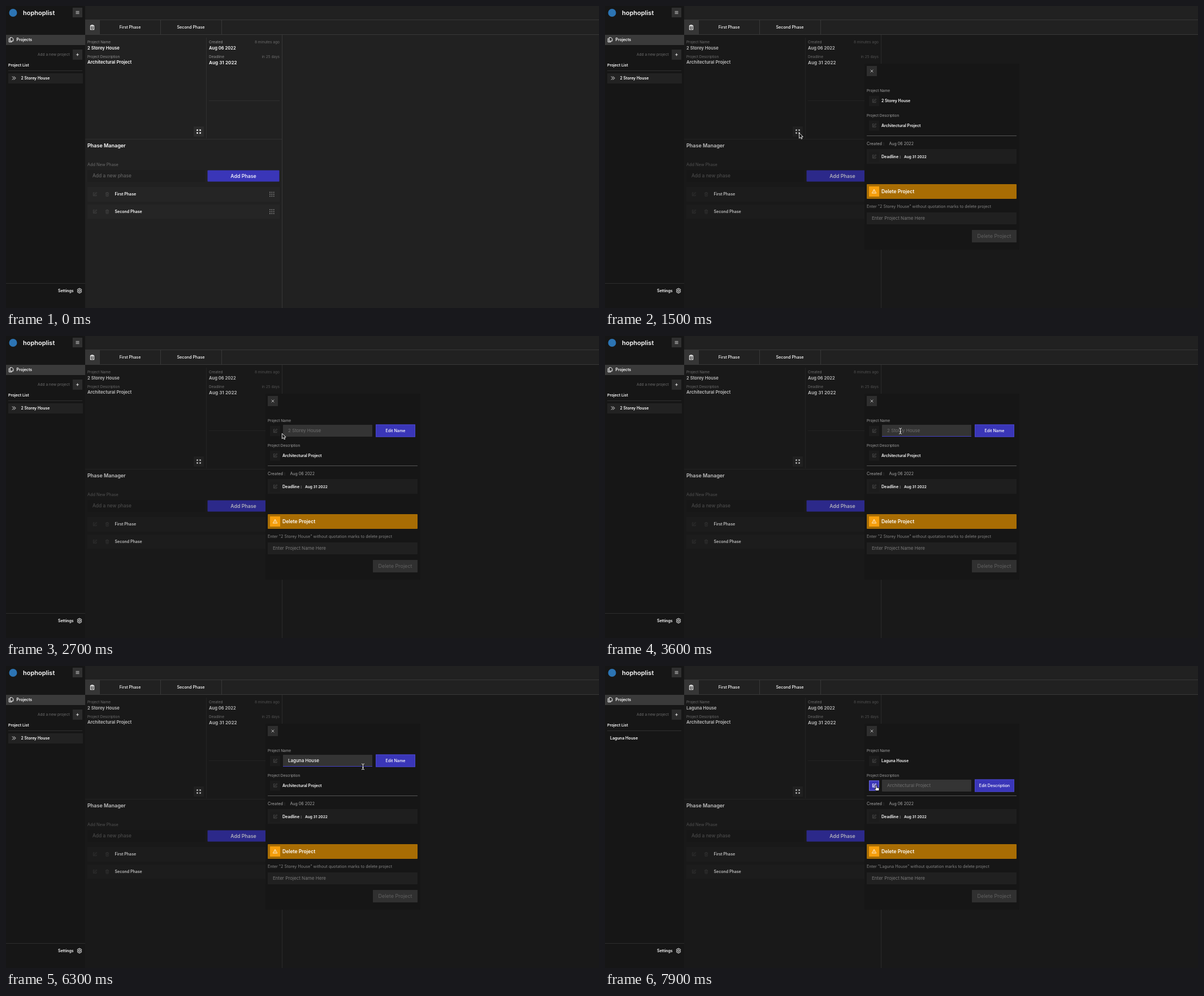
Recreate the animation shown at these times as an HTML page with a canvas. Size 1049x534 px, loop 8000 ms.

```html
<!DOCTYPE html>
<html lang="en">
<head>
<meta charset="utf-8">
<title>Project editor</title>
<style>
html, body { margin: 0; width: 100%; height: 100%; overflow: hidden; background: #212121; }
canvas { display: block; width: 100%; height: 100%; }
</style>
</head>
<body>
<canvas id="stage" width="1049" height="534"></canvas>
<script>
const ctx = document.getElementById('stage').getContext('2d');
const LOOP = 8000, STEP = 100, BOLD = 600;
const BLUE = '#3a36b8', WHITE = '#fff', GREY = '#929292', DIM = '#6c6c6c';
const LINE = '#383838', FAINT = '#2f2f2f';
const OPEN = 1500, EDIT_NAME = 2500, FOCUS = 3100, SAVE = 6800, EDIT_TEXT = 7700;
const OLD_NAME = '2 Storey House', NEW_NAME = 'Laguna House', ABOUT = 'Architectural Project';

const keyTimes = [3800, 4000, 4100, 4300, 4500, 4600, 4900, 5000, 5100, 5200, 5300, 5600];
const clicks = [[1100, 1500], [2300, 2600], [3000, 3200], [6500, 6800], [7500, 7800]];
const route = [
  [300, 413, 286], [1000, 343.5, 224.5], [1500, 343.5, 224.5], [2100, 482, 173],
  [2600, 482, 173], [3000, 522.5, 168], [5800, 522.5, 168], [6300, 631.5, 178],
  [6500, 673, 168], [7100, 673, 168], [7600, 480, 211]
];

// Icons live in a 24 unit box.
const icons = {
  edit: 'M11 4H5v15h15v-6M9 15l1-4 9-9 3 3-9 9z',
  trash: 'M4 6h16M9 6V3h6v3M6 6l1 15h10l1-15M10 10v7M14 10v7',
  board: 'M8 5H5v16h14V5h-3M9 3h6v4H9zM9 12h6M9 16h6',
  docs: 'M8 3h8l5 5v10H8zM5 7H3v15h12v-2',
  next: 'M4 4l8 8-8 8M12 4l8 8-8 8',
  expand: 'M8 8L4 4M3 9V3h6M16 8l4-4M15 3h6v6M8 16l-4 4M3 15v6h6M16 16l4 4M21 15v6h-6',
  close: 'M5 5l14 14M19 5L5 19',
  plus: 'M12 4v16M4 12h16',
  menu: 'M3 6h18M3 12h18M3 18h18',
  warn: 'M12 3L2 21h20zM12 9v6M12 17v2',
  gear: 'M10 2h4l1 3 3-1 3 4-2 3v2l2 3-3 4-3-1-1 3h-4l-1-3-3 1-3-4 2-3v-2L3 8l3-4 3 1z' +
    'M8 12a4 4 0 1 0 8 0a4 4 0 1 0-8 0'
};
// Pointers are relative to the hot spot, in pixels.
const pointers = {
  arrow: 'M0 0V9.5L2.3 7.4 3.8 10.6 5.3 10 3.9 6.8H6.8Z',
  hand: 'M-1 0Q0-1 1 0V4L4 4.6Q5.5 5 5 7L4.3 9.5H-.5L-3 6.5Q-3.4 5.2-2 5.4L-1 6.3Z',
  beam: 'M-2.5-5Q0-5 0-4Q0-5 2.5-5M0-4V4M-2.5 5Q0 5 0 4Q0 5 2.5 5M-1.2 1.5H1.2'
};

function box(x, y, w, h, fill, border, r = 0) {
  ctx.beginPath();
  ctx.roundRect(x, y, w, h, r);
  ctx.fillStyle = fill;
  ctx.fill();
  if (!border) return;
  ctx.strokeStyle = border;
  ctx.lineWidth = 1;
  ctx.strokeRect(x + .5, y + .5, w - 1, h - 1);
}

const hline = (x, y, w, color = LINE) => box(x, y, w, 1, color);
const vline = (x, y, h, color = LINE) => box(x, y, 1, h, color);

// y is the middle of the capitals.
function text(str, x, y, size, color = WHITE, weight = 400, align = 'left') {
  ctx.font = `${weight} ${size}px Inter, sans-serif`;
  ctx.textAlign = align;
  ctx.fillStyle = color;
  ctx.fillText(str, x, y + size * .34);
}

function icon(name, x, y, size, color = WHITE, width = 2) {
  const k = size / 24;
  ctx.save();
  ctx.translate(x - size / 2, y - size / 2);
  ctx.scale(k, k);
  ctx.strokeStyle = color;
  ctx.lineWidth = width;
  ctx.stroke(new Path2D(icons[name]));
  ctx.restore();
}

const inside = (p, x, y, w, h) => p.x >= x && p.x <= x + w && p.y >= y && p.y <= y + h;

function pointerAt(t) {
  let i = route.findIndex(k => k[0] > t);
  if (i < 0) i = route.length;
  const a = route[Math.max(0, i - 1)], b = route[Math.min(i, route.length - 1)];
  const u = b[0] > a[0] ? (t - a[0]) / (b[0] - a[0]) : 0;
  const e = u * u * (3 - 2 * u);
  return { x: a[1] + (b[1] - a[1]) * e, y: a[2] + (b[2] - a[2]) * e };
}

function drawSidebar(name, saved) {
  box(0, 0, 140, 534, '#161616');
  ctx.beginPath();
  ctx.arc(12.5, 12, 7, 0, 7);
  ctx.fillStyle = '#2c74b3';
  ctx.fill();
  text('hophoplist', 30, 12, 11, WHITE, BOLD);
  box(118, 3, 17, 17, '#303030');
  icon('menu', 126.5, 11.5, 8);
  box(0, 51, 140, 18, '#3a3a3a');
  icon('docs', 9, 59.5, 10, WHITE, 2.4);
  text('Projects', 18.5, 59.5, 7, WHITE, BOLD);
  text('Add a new project', 56, 86, 6.6, DIM);
  box(118, 77, 17, 18, '#2b2b2b');
  icon('plus', 126.5, 86, 7, WHITE, 2.8);
  text('Project List', 4, 104.5, 6.8, WHITE, BOLD);
  hline(4, 114, 131, FAINT);
  if (saved) text(name, 9, 128, 7.1, WHITE, BOLD);
  else {
    box(4, 119, 132, 18, '#222');
    icon('next', 14, 127.5, 9, WHITE, 2.6);
    text(name, 26.5, 128, 6.9, WHITE, BOLD);
  }
  hline(0, 490, 140, '#2d2d2d');
  text('Settings', 92, 503.5, 6.95, WHITE, BOLD);
  icon('gear', 130, 503.5, 10, WHITE, 2.4);
}

function drawHeader() {
  hline(140, 24, 909);
  hline(140, 50, 909);
  box(140, 25, 26, 25, '#363636');
  icon('board', 152.5, 37.8, 10.5, WHITE, 2.4);
  [165, 273, 381].forEach(x => vline(x, 25, 25));
  text('First Phase', 219.5, 37.5, 7.1, WHITE, 500, 'center');
  text('Second Phase', 327, 37.5, 7.2, WHITE, 500, 'center');
}

function drawPanel(name, hover) {
  vline(354, 56, 178, FAINT);
  vline(488, 51, 483);
  hline(140, 235, 348, FAINT);
  hline(359, 167, 125, FAINT);
  text('Project Name', 144, 64, 6.45, GREY);
  text(name, 144, 74.5, 7.7, WHITE, BOLD);
  text('Project Description', 144, 89.5, 6.35, GREY);
  text(ABOUT, 144, 99.5, 7.9, WHITE, BOLD);
  text('Created', 359, 64, 6.5, GREY);
  text('Aug 06 2022', 359, 74.5, 7.6, WHITE, BOLD);
  text('8 minutes ago', 484, 64, 6.6, DIM, 400, 'right');
  text('Deadline', 359, 89.5, 6.5, GREY);
  text('Aug 31 2022', 359, 100.5, 8.2, WHITE, BOLD);
  text('in 25 days', 484, 89.5, 6.5, DIM, 400, 'right');
  box(332, 213, 18, 18, hover ? BLUE : '#2b2b2b', hover && '#5552d4');
  icon('expand', 341, 222, 8.5, WHITE, 3);
  text('Phase Manager', 144, 246.5, 9, WHITE, BOLD);
  text('Add New Phase', 144, 280.5, 7.3, DIM);
  box(144, 290, 208, 21, '#1e1e1e');
  text('Add a new phase', 153, 300, 8.45, DIM);
  box(356.5, 290.5, 127, 20, BLUE, null, 1);
  text('Add Phase', 420, 300.5, 8.85, WHITE, 500, 'center');
  ['First Phase', 'Second Phase'].forEach((label, i) => {
    const y = 333 + i * 30.7;
    box(144, y - 13, 340, 26, '#252525');
    icon('edit', 157, y, 9, '#484848');
    icon('trash', 179, y, 9, '#484848');
    text(label, 192.5, y, 7, WHITE, BOLD);
    for (let k = 0; k < 9; k++)
      box(466 + k % 3 * 3.4, y - 4.4 + Math.floor(k / 3) * 3.4, 1.8, 1.8, '#777');
  });
}

function editButton(y, hover) {
  if (hover) box(467, y - 9, 18, 18, BLUE, '#6c6ae0');
  else box(467, y - 9, 18, 18, '#1c1c1c');
  icon('edit', 476, y, 9, hover ? WHITE : '#555', hover ? 2.5 : 2);
}

function field(y, hint, value, label, focused) {
  box(490, y - 10.5, 158, 21, '#343434', null, 1);
  if (focused) box(490, y + 9.5, 158, 1, '#4440c4');
  text(value || hint, 499, y, 8, value ? WHITE : '#707070', value ? 500 : 400);
  box(654, y - 11, 70, 22, BLUE, '#4a47cc');
  text(label, 689, y, 7.2, WHITE, 500, 'center');
}

function drawDialog(t, p, name) {
  box(459, 102, 274, 329, '#161616', null, 2);
  box(463, 106, 18, 18, '#2e2e2e');
  icon('close', 472, 115, 8);

  text('Project Name', 463, 150, 6.45, '#a4a4a4');
  editButton(168, inside(p, 467, 159, 18, 18));
  if (t >= EDIT_NAME && t < SAVE) {
    const typed = keyTimes.filter(k => k <= t);
    const value = NEW_NAME.slice(0, typed.length);
    field(167.5, name, value, 'Edit Name', t >= FOCUS);
    if (t >= FOCUS) {
      const last = typed.length ? typed[typed.length - 1] : FOCUS;
      ctx.font = '500 8px Inter, sans-serif';
      if ((t - last) % 1000 < 500) vline(499 + Math.round(ctx.measureText(value).width), 162, 11, WHITE);
    }
  } else text(name, 489, 167.5, 6.95, WHITE, BOLD);

  text('Project Description', 463, 194, 6.35, '#a4a4a4');
  editButton(211.5, inside(p, 467, 202, 18, 18));
  if (t >= EDIT_TEXT) field(211.5, ABOUT, '', 'Edit Description', false);
  else text(ABOUT, 489, 211.5, 7, WHITE, BOLD);

  hline(463, 229, 265, '#555');
  text('Created :', 463, 244, 7.2, '#a8a8a8');
  text('Aug 06 2022', 502.5, 244, 7.05, '#a8a8a8');
  box(463, 253, 265, 26, '#1e1e1e');
  editButton(266.5, false);
  text('Deadline :', 489, 266.5, 7.1, WHITE, BOLD);
  text('Aug 31 2022', 529, 266.5, 6.6, WHITE, BOLD);

  box(463, 315, 265, 26, '#a86d04', null, 1);
  box(467, 319, 18, 18, '#f59e0b');
  icon('warn', 476, 327.5, 9);
  text('Delete Project', 489, 328, 8.6, WHITE, BOLD);
  text(`Enter "${name}" without quotation marks to delete project`, 463, 355, 7.2, '#858585');
  box(463, 365, 265, 21, '#202020');
  text('Enter Project Name Here', 472, 375.5, 8.05, '#7a7a7a');
  box(649, 396, 79, 22, '#303030');
  text('Delete Project', 688.5, 407, 9.05, '#606060', 400, 'center');
}

function pointerKind(t, p) {
  if (t < OPEN) return inside(p, 332, 213, 18, 18) || inside(p, 356, 290, 128, 21) ? 'hand' : 'arrow';
  const naming = t >= EDIT_NAME && t < SAVE, describing = t >= EDIT_TEXT;
  if (inside(p, 467, 159, 18, 18) || inside(p, 467, 202, 18, 18)) return 'hand';
  if (naming && inside(p, 654, 157, 70, 22)) return 'hand';
  if (naming && inside(p, 490, 157, 158, 22)) return 'beam';
  return describing && inside(p, 490, 201, 158, 21) ? 'beam' : 'arrow';
}

function ring(x, y, r, color, width) {
  ctx.beginPath();
  ctx.arc(x, y, r, 0, 2 * Math.PI);
  ctx.strokeStyle = color;
  ctx.lineWidth = width;
  ctx.stroke();
}

function drawPointer(t, p) {
  const typing = t >= keyTimes[0] && t < 5900;
  if (t < 100 || typing) return;
  if (clicks.some(([from, to]) => t >= from && t < to)) {
    ring(p.x, p.y, 15.5, '#181818', 2.6);
    ring(p.x, p.y, 16.6, '#d8d8d8', .8);
    ring(p.x, p.y, 14.4, '#d8d8d8', .8);
  }
  const kind = pointerKind(t, p), shape = new Path2D(pointers[kind]);
  ctx.save();
  ctx.translate(p.x, p.y);
  ctx.lineWidth = kind === 'beam' ? 2.2 : .9;
  ctx.strokeStyle = kind === 'arrow' ? '#fff' : '#111';
  ctx.fillStyle = kind === 'arrow' ? '#111' : '#fff';
  if (kind !== 'beam') ctx.fill(shape);
  ctx.stroke(shape);
  if (kind === 'beam') {
    ctx.lineWidth = 1;
    ctx.strokeStyle = '#fff';
    ctx.stroke(shape);
  }
  ctx.restore();
}

function draw(t) {
  const p = pointerAt(t), open = t >= OPEN, saved = t >= SAVE;
  const name = saved ? NEW_NAME : OLD_NAME;
  box(0, 0, 1049, 534, '#212121');
  ctx.save();
  if (open) ctx.filter = 'blur(0.6px)';
  drawPanel(name, !open && inside(p, 332, 213, 18, 18));
  ctx.restore();
  if (open) box(140, 51, 909, 483, 'rgba(0,0,0,.25)');
  drawHeader();
  drawSidebar(name, saved);
  if (open) drawDialog(t, p, name);
  drawPointer(t, p);
}

let shown = -1;
const start = performance.now();
function tick() {
  const t = Math.floor((performance.now() - start) % LOOP / STEP) * STEP;
  if (t !== shown) draw(shown = t);
  requestAnimationFrame(tick);
}
tick();
</script>
</body>
</html>
```
